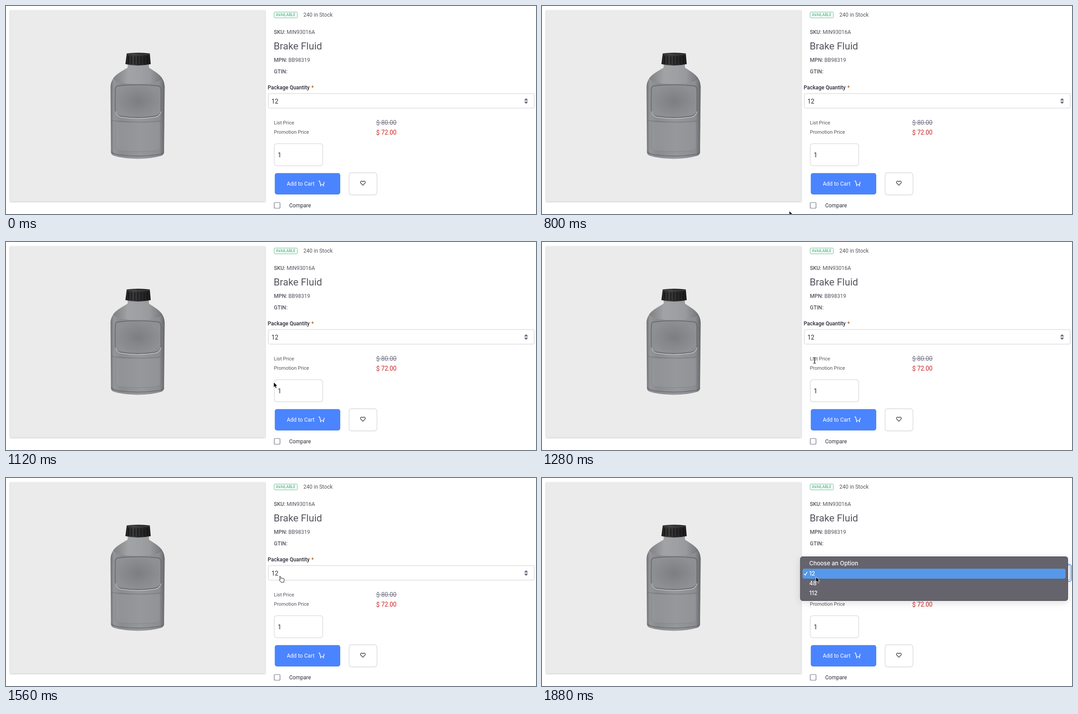
These frames come from a looping animation (1194x469 px, 1920 ms). An HTML page:

```html
<!DOCTYPE html>
<html lang="en">
<head>
<meta charset="utf-8">
<title>Product page</title>
<style>
  html, body { margin: 0; width: 100%; height: 100%; overflow: hidden; background: #fff; }
  svg { display: block; width: 1194px; height: 469px; font: 12px Roboto, sans-serif; fill: #54555f; }
  .b { font-weight: 500; }
  .dark { fill: #2b2c38; }
  .small { font-size: 11px; }
  .price { font-size: 13.8px; }
  .box { fill: #fff; stroke: #e2e2e6; stroke-width: 1.8; }
  #menu text { font: 500 12.9px Inter, sans-serif; fill: #fff; }
  .ring { fill: none; stroke: #4b84ff; }
</style>
</head>
<body>
<svg viewBox="0 0 1194 469">
  <defs>
    <linearGradient id="body">
      <stop offset="0" stop-color="#6f7073"/>
      <stop offset=".06" stop-color="#949598"/>
      <stop offset=".2" stop-color="#8b8c8f"/>
      <stop offset=".55" stop-color="#96979a"/>
      <stop offset=".9" stop-color="#8c8d90"/>
      <stop offset="1" stop-color="#66676a"/>
    </linearGradient>
    <linearGradient id="neck">
      <stop offset="0" stop-color="#77787a"/>
      <stop offset=".3" stop-color="#aaabad"/>
      <stop offset=".75" stop-color="#9c9da0"/>
      <stop offset="1" stop-color="#6c6d70"/>
    </linearGradient>
    <linearGradient id="cap">
      <stop offset="0" stop-color="#1d1d1e"/>
      <stop offset=".3" stop-color="#3c3c3d"/>
      <stop offset=".6" stop-color="#2c2c2d"/>
      <stop offset="1" stop-color="#19191a"/>
    </linearGradient>
    <radialGradient id="dent">
      <stop offset="0" stop-color="#7d7e81"/>
      <stop offset="1" stop-color="#8f9093"/>
    </radialGradient>
    <filter id="soft" x="-5%" y="-5%" width="110%" height="110%">
      <feDropShadow dx="0" dy="1" stdDeviation="1.5" flood-opacity=".3"/>
    </filter>
    <filter id="drop" x="-5%" y="-30%" width="110%" height="160%">
      <feDropShadow dx="0" dy="4" stdDeviation="8" flood-opacity=".13"/>
    </filter>
  </defs>

  <rect x="9" y="9.500" width="575" height="431" fill="#ebebeb" filter="url(#soft)"/>

  <!-- bottle -->
  <path d="M274 132H322V139C338 150 357 158 357.500 182L356 331Q355 336 349 338Q328 344 297 344.500Q264 344 244 338Q237 336 236.500 330L235.500 182C236 159 257 150 274 139Z" fill="url(#body)"/>
  <path d="M274 132H322V139C333 147 346 153 352 164Q340 176 297 176Q252 176 241 164C247 153 262 147 274 139Z" fill="url(#neck)" opacity=".7"/>
  <path d="M252 180Q297 175 343 180Q349 181 349 190V236Q348 245 338 248Q297 255 256 248Q247 245 246 236V190Q246 181 252 180Z" fill="url(#dent)" stroke="#6b6c6f" stroke-width="2"/>
  <path d="M247 238Q249 248 258 250.500Q297 257 337 250.500Q347 248 349 238" fill="none" stroke="#bcbdbf" stroke-width="1.500"/>
  <path d="M238 258Q297 266 355 258" fill="none" stroke="#727376" stroke-width="1.200"/>
  <path d="M247 263V320Q248 325 256 326Q297 331 338 326Q346 325 347 320V263" fill="#98999c" fill-opacity=".5" stroke="#858689"/>
  <path d="M237 328Q240 333 250 335Q297 342 344 335Q354 333 356 328" fill="none" stroke="#67686b" stroke-width="1.500"/>
  <path d="M272 107Q297 103.500 324 107L326 131Q297 137.500 269 131Z" fill="url(#cap)"/>
  <path d="M272 109Q297 112 324 109" fill="none" stroke="#565657"/>
  <path d="M276 113V130M283 114V131M290 114V132M297 114V132M304 114V132M311 114V131M318 113V130" stroke="#111" stroke-width="1.500"/>

  <!-- details -->
  <rect x="604.200" y="13.700" width="52" height="13" rx="2" fill="#fff" stroke="#5aba8b"/>
  <text x="608" y="23.300" class="b" style="font-size:8.500px;fill:#4db583">AVAILABLE</text>
  <text x="670" y="23.500">240 in Stock</text>
  <text x="603.500" y="63"><tspan class="b">SKU:</tspan> MIN93016A</text>
  <text x="603" y="97.500" style="font-size:22.200px">Brake Fluid</text>
  <text x="603.500" y="126"><tspan class="b">MPN:</tspan> BB98319</text>
  <text x="603.500" y="152" class="b">GTIN:</text>
  <text x="589.500" y="188" class="b dark">Package Quantity <tspan fill="#b95000" dx="1">*</tspan></text>
  <rect class="box" x="591" y="197.300" width="599" height="33" rx="4"/>
  <text x="598" y="220" class="price dark">12</text>
  <path d="M1167.200 213L1171.700 207.700L1176.200 213ZM1167.200 215.500H1176.200L1171.700 220.800Z" fill="#6b6c7e"/>
  <text x="603.500" y="266.500" class="small">List Price</text>
  <text x="603.500" y="288.200" class="small">Promotion Price</text>
  <text x="834" y="267.500" class="price" fill="#6b6c7e">$ 80.00</text>
  <path d="M834 263H880" stroke="#6b6c7e"/>
  <text x="834" y="290" class="price" fill="#c9211e">$ 72.00</text>
  <rect class="box" x="604.500" y="310.300" width="109" height="50" rx="6"/>
  <text x="612" y="340.500" class="dark" style="font-size:15px">1</text>

  <!-- actions -->
  <rect x="605.500" y="376.700" width="147.500" height="48.300" rx="5" fill="#4b84ff"/>
  <text x="632.500" y="404.500" style="font-size:12.400px;fill:#fff">Add to Cart</text>
  <path d="M704 394.500H706.500L708.500 402.500H715.500L717 396.500" fill="none" stroke="#fff" stroke-width="1.500" stroke-linejoin="round"/>
  <circle cx="709" cy="405" r="1.300" fill="#fff"/>
  <circle cx="715" cy="405" r="1.300" fill="#fff"/>
  <rect class="box" x="772.700" y="376" width="63" height="50" rx="6"/>
  <path d="M804 404.300L799.300 399.400C796.800 396.500 801 392.500 804 396.300C807 392.500 811.200 396.500 808.700 399.400Z" fill="none" stroke="#54555f" stroke-width="1.600" stroke-linejoin="round"/>
  <rect x="604.300" y="443" width="13" height="13" rx="2" fill="#fff" stroke="#6b6c7e" stroke-width="1.200"/>
  <text x="638" y="453.500" class="dark">Compare</text>

  <g id="menu">
    <g id="focus">
      <rect class="ring" x="591" y="197.300" width="599" height="33" rx="4" stroke-opacity=".6"/>
      <rect class="ring" x="588" y="194.500" width="605" height="39" rx="6" stroke-width="1.500"/>
    </g>
    <rect x="582" y="177.500" width="602.500" height="99" rx="5" fill="#65636c" stroke="#44434a" filter="url(#drop)"/>
    <rect x="587" y="204.500" width="592.500" height="22.500" rx="4" fill="#5698ea"/>
    <path d="M590.500 216L593 219L597.500 211.800" fill="none" stroke="#fff" stroke-width="1.500"/>
    <text x="602" y="197">Choose an Option</text>
    <text x="602" y="219.600">12</text>
    <text x="602" y="242">48</text>
    <text x="602" y="264.400">112</text>
  </g>

  <g id="pointer" stroke-linejoin="round">
    <path id="arrow" d="M0 0V12L2.800 9.500L4.700 14L7 13L5 8.700H8.700Z" fill="#000" stroke="#fff" stroke-width=".9"/>
    <path id="beam" d="M-3 -6.500Q0 -6.500 0 -4.500Q0 -6.500 3 -6.500M0 -5V5M-3 6.500Q0 6.500 0 4.500Q0 6.500 3 6.500M-1.500 1.500H1.500" fill="none" stroke="#222" stroke-width="1.200"/>
    <path id="hand" d="M-1.800 1Q-1.500 -.6 0 .2L1.800 5Q2.600 3.600 4 4.700Q5.300 3.700 6.300 5.200Q8 4.500 8.600 6.500Q9.300 9 8.200 11L7.800 13.600H1.700L-2.200 9Q-2.700 7.200 -.3 7.800Z" fill="#fff" stroke="#111"/>
  </g>
</svg>
<script>
  const LOOP = 1920, STEP = 40, SHOW = 800, OPEN = 1720;
  // time, x, y of the pointer's hot spot
  const path = [
    [800, 557, 462], [960, 584, 378], [1120, 603, 316], [1280, 614, 267],
    [1360, 615.5, 251], [1440, 617, 236], [1560, 618, 221.5],
    [1680, 618, 221.5], [1720, 618, 219.5], [1880, 617, 223]
  ];
  const el = id => document.getElementById(id);
  const show = (id, on) => el(id).style.display = on ? "" : "none";

  function pointerAt(t) {
    const i = Math.max(1, path.findIndex(p => p[0] >= t));
    const [t0, x0, y0] = path[i - 1], [t1, x1, y1] = path[i];
    const k = (t - t0) / (t1 - t0);
    return [x0 + (x1 - x0) * k, y0 + (y1 - y0) * k];
  }

  function kindAt(t, y) {
    if (t >= OPEN) return "arrow";
    if (y < 231) return "hand";
    return y > 255 && y < 292 ? "beam" : "arrow";
  }

  function draw(t) {
    show("menu", t >= OPEN);
    show("pointer", t >= SHOW);
    if (t < SHOW) return;
    const [x, y] = pointerAt(t), kind = kindAt(t, y);
    el("pointer").setAttribute("transform", `translate(${x} ${y})`);
    for (const id of ["arrow", "beam", "hand"]) show(id, id === kind);
    el("focus").style.opacity = Math.max(0.15, (t - OPEN) / 160);
  }

  const start = performance.now();
  function tick() {
    const t = (performance.now() - start) % LOOP;
    draw(Math.floor(t / STEP) * STEP);
    requestAnimationFrame(tick);
  }
  tick();
</script>
</body>
</html>
```
